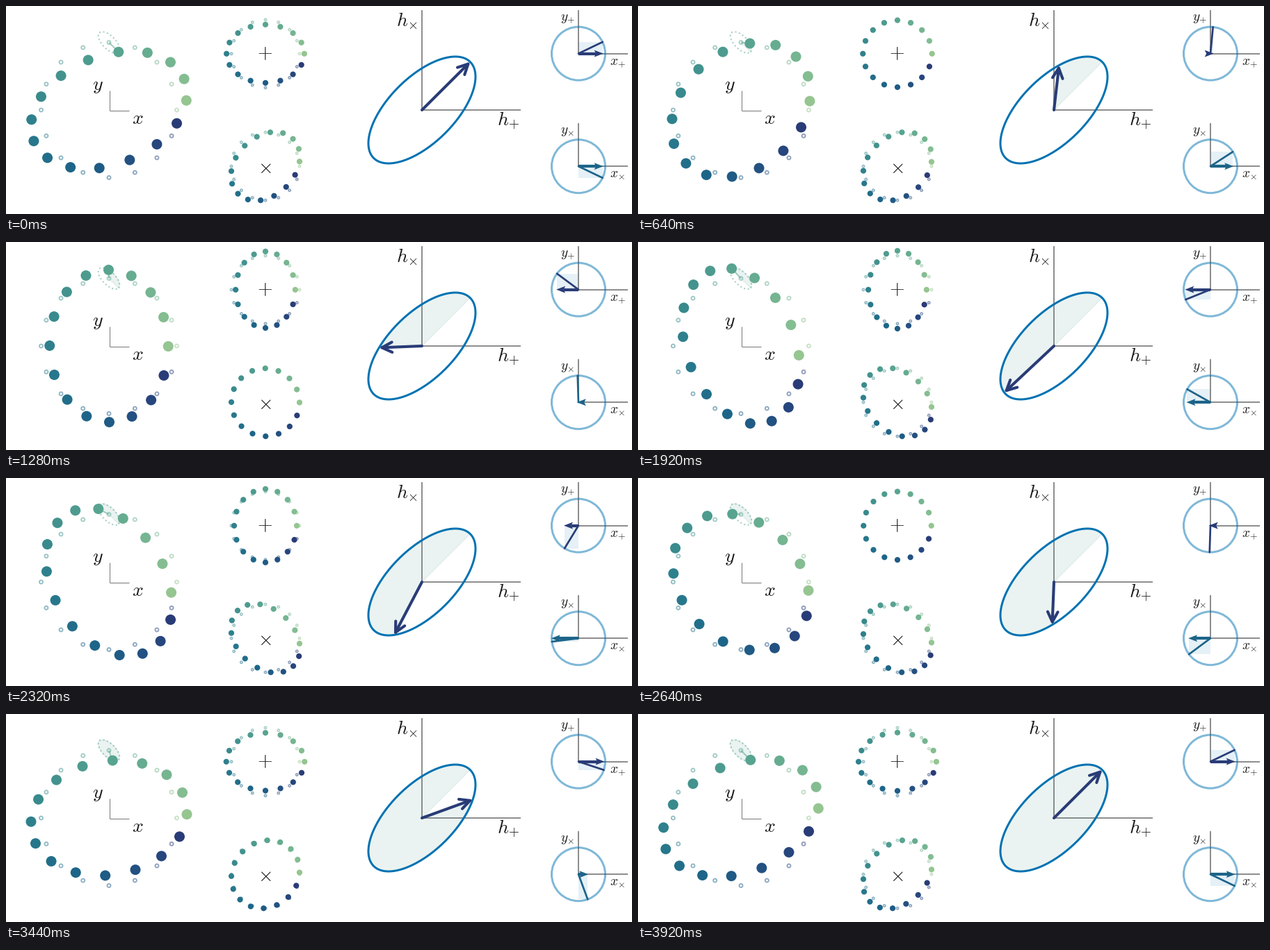
A matplotlib script for the animation above (4 s loop, 900 by 300 pixels).

```python
import numpy as np
import matplotlib.pyplot as plt
from matplotlib.animation import FuncAnimation
from matplotlib.colors import LinearSegmentedColormap
from matplotlib.patches import Circle, Polygon, Rectangle

plt.rcParams["mathtext.fontset"] = "cm"
plt.rcParams["toolbar"] = "None"

W, H, DPI = 900, 300, 100
FRAMES, INTERVAL = 50, 80
PX = 72 / DPI                 # points per pixel
PHASE = np.pi / 7             # half the phase lag between polarisations
STRAIN = 0.157
AMP = 77                      # size of the polarisation ellipse

CREST = LinearSegmentedColormap.from_list("sea", [
    "#a5cd90", "#7dba91", "#59a590", "#40908e",
    "#287a8c", "#1c6488", "#254b7f", "#2c3172"])
COUNT = 16
COLORS = CREST(np.arange(1, COUNT + 1) / (COUNT + 1))
TOP = COLORS[COUNT // 4]
NAVY, TEAL, BLUE = COLORS[-1], "#1c6488", "#0072b2"
ANGLES = np.arange(COUNT) * 2 * np.pi / COUNT

fig = plt.figure(figsize=(W / DPI, H / DPI), dpi=DPI, facecolor="white")
ax = fig.add_axes([0, 0, 1, 1])
ax.set_xlim(0, W)
ax.set_ylim(H, 0)
ax.axis("off")


def waves(turn):
    """Plus and cross amplitudes at the given wave phase."""
    return np.cos(turn + PHASE), np.cos(turn - PHASE)


def line(xs, ys, color, width, z, **kw):
    kw.setdefault("solid_capstyle", "butt")
    return ax.plot(xs, ys, color=color, lw=width * PX, zorder=z, **kw)[0]


def corner(x, y, right, top, color, width):
    line([x, x], [y, top], color, width, 2)
    line([x, right], [y, y], color, width, 2)


def label(x, y, tex, size, ha="left"):
    ax.text(x, y, f"${tex}$", fontsize=size, color="0.1", ha=ha,
            va="baseline", zorder=9)


class Ring:
    """Free particles on a circle, stretched by the wave."""

    def __init__(self, x, y, radius, dot, ghost, edge):
        self.x, self.y, self.radius = x, y, radius
        rest = self.places(0, 0)
        ax.scatter(*rest.T, s=(ghost * PX) ** 2, facecolors="none",
                   edgecolors=COLORS, linewidths=edge * PX, alpha=0.5, zorder=4)
        self.dots = ax.scatter(*rest.T, s=(dot * PX) ** 2, c=COLORS,
                               linewidths=0, zorder=6)

    def places(self, plus, cross):
        c, s = np.cos(ANGLES), np.sin(ANGLES)
        u = c + STRAIN * (plus * c + cross * s)
        v = s + STRAIN * (cross * c - plus * s)
        return np.column_stack([self.x + self.radius * u,
                                self.y - self.radius * v])

    def update(self, plus, cross):
        self.dots.set_offsets(self.places(plus, cross))


class Phasor:
    """Rotating pointer with its projection on the x axis."""

    def __init__(self, y, shift, color):
        self.x, self.y, self.radius, self.shift = 823, y, AMP / 2, shift
        ax.add_patch(Circle((self.x, y), self.radius, fill=False, ec=BLUE,
                            lw=3 * PX, alpha=0.5, zorder=3))
        corner(self.x, y, 894, y - 62.5, "0.45", 1.6)
        self.box = ax.add_patch(Rectangle((self.x, y), 0, 0, fc=BLUE, lw=0,
                                          alpha=0.1, zorder=1))
        self.hand = line([], [], color, 2.7, 5, solid_capstyle="round")
        self.shaft = line([], [], color, 4.2, 6)
        self.head = ax.add_patch(Polygon([(0, 0)] * 4, fc=color, lw=0, zorder=6))

    def update(self, turn):
        dx = self.radius * np.cos(turn + self.shift)
        dy = -self.radius * np.sin(turn + self.shift)
        x, y = self.x, self.y
        self.box.set_width(dx)
        self.box.set_height(dy)
        self.hand.set_data([x, x + dx], [y, y + dy])
        side = 1 if dx > 0 else -1
        tip = x + dx + side
        neck = tip - side * 10.5
        back = tip - side * 13
        self.shaft.set_data([x, neck] if abs(dx) > 9 else [], [y, y] if abs(dx) > 9 else [])
        self.head.set_xy([(tip, y), (back, y - 5), (neck, y), (back, y + 5)])


class Sweep:
    """Area swept out from a centre along an elliptic path."""

    def __init__(self, x, y, path):
        self.x, self.y, self.path = x, y, path
        self.patch = ax.add_patch(Polygon([(x, y)] * 3, fc=TOP, ec=TOP,
                                          lw=1.4 * PX, alpha=0.12, zorder=1))

    def at(self, turn):
        dx, dy = self.path(*waves(turn))
        return self.x + dx, self.y - dy

    def update(self, turn):
        edge = np.column_stack(self.at(np.linspace(0, turn, 120)))
        self.patch.set_xy(np.vstack([(self.x, self.y), edge]))


full = np.linspace(0, 2 * np.pi, 241)

# particle rings
main = Ring(148, 150, 97.5, 15, 5, 1.9)
plus_ring = Ring(373, 68.8, 49, 8.2, 3.2, 1.7)
cross_ring = Ring(373, 231.2, 49, 8.2, 3.2, 1.7)
corner(148.5, 150.5, 177, 121.5, "0.5", 1.1)

# path of the top particle
sway = STRAIN * main.radius
trail = Sweep(148, 52.5, lambda p, c: (sway * c, -sway * p))
line(*trail.at(full), TOP, 2.1, 3, ls=":", alpha=0.5)
stem = line([], [], TOP, 2, 3, alpha=0.5)

# polarisation ellipse
corner(598, 150, 740, 6, "0.45", 1.6)
orbit = Sweep(598, 150, lambda p, c: (AMP * p, AMP * c))
line(*orbit.at(full), BLUE, 3, 3)
arrow = line([], [], NAVY, 4.1, 5, solid_capstyle="round")
barbs = line([], [], NAVY, 4.1, 5, solid_capstyle="round",
             solid_joinstyle="round")

plus_hand = Phasor(68.6, PHASE, NAVY)
cross_hand = Phasor(231.2, -PHASE, TEAL)

label(124.5, 121, "y", 20)
label(181, 170, "x", 20)
label(372, 76, "{+}", 20, "center")
label(371.3, 241, r"{\times}", 20, "center")
label(561, 29, r"h_{\times}", 20)
label(706, 173, "h_{+}", 20)
label(797, 21, "y_{+}", 14)
label(797, 183.5, r"y_{\times}", 14)
label(868.5, 84.5, "x_{+}", 14)
label(868.5, 247.5, r"x_{\times}", 14)


def draw_arrow(x, y):
    start = np.array([orbit.x, orbit.y])
    reach = np.array([x, y]) - start
    along = reach / np.hypot(*reach)
    across = np.array([-along[1], along[0]])
    tip = start + reach - 4.2 * along
    arrow.set_data(*np.array([start, tip]).T)
    back = tip - 14.5 * along
    barbs.set_data(*np.array([back + 7.3 * across, tip, back - 7.3 * across]).T)


def update(frame):
    turn = 2 * np.pi * frame / (FRAMES - 1)
    plus, cross = waves(turn)
    main.update(plus, cross)
    plus_ring.update(plus, 0)
    cross_ring.update(0, cross)
    trail.update(turn)
    orbit.update(turn)
    x, y = trail.at(turn)
    stem.set_data([trail.x, x], [trail.y, y])
    draw_arrow(*orbit.at(turn))
    plus_hand.update(turn)
    cross_hand.update(turn)
    return []


anim = FuncAnimation(fig, update, frames=FRAMES, interval=INTERVAL,
                     init_func=lambda: update(0), repeat=True, repeat_delay=0)
plt.show()
```
